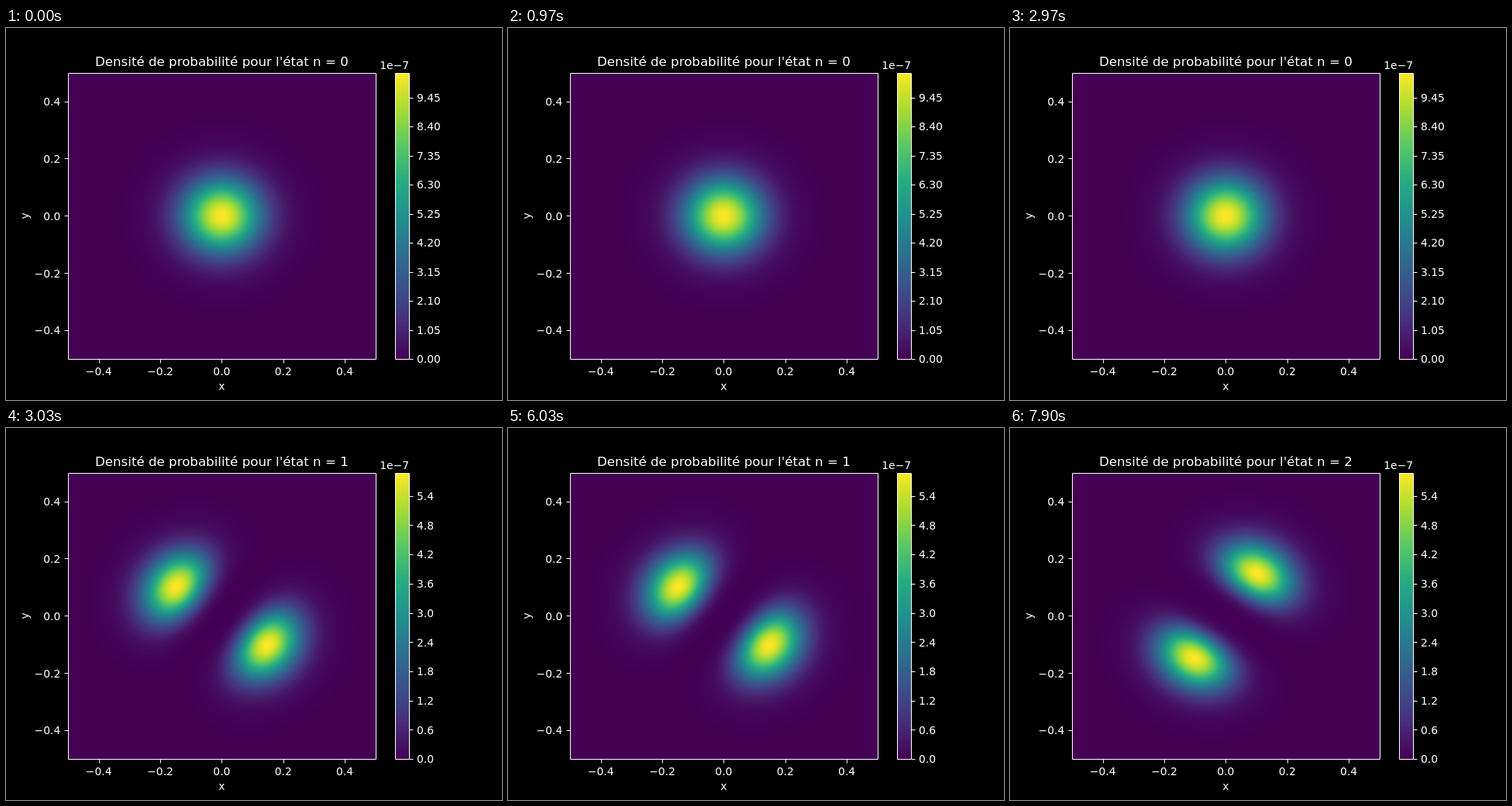
An HTML page with a canvas for the animation above (8000 ms loop, 640 px wide and 480 px high).

```html
<!DOCTYPE html>
<html lang="fr">
<head>
<meta charset="utf-8">
<title>Densité de probabilité</title>
<style>
  html, body { margin: 0; width: 100%; height: 100%; overflow: hidden; background: #000; }
  canvas, svg { position: absolute; left: 0; top: 0; }
  text { font: 13.89px "DejaVu Sans", sans-serif; fill: #fff; }
  .title { font-size: 16.67px; }
  path { fill: none; stroke: #fff; stroke-width: 1; }
</style>
</head>
<body>
<canvas id="heat" width="640" height="480"></canvas>
<svg id="axes" width="640" height="480"></svg>
<script>
const LOOP = 8000;
const plot = { left: 80, top: 57.6, width: 396.8, height: 369.6 };
const bottom = plot.top + plot.height;
const barRight = 520.1;
const SPREAD = 0.0162;           // Gaussian width squared
const AXIS = [-0.822, 0.57];     // direction of the first excited state

// Each state: start time, lobe direction, colour bar maximum, tick step, decimals
const states = [
  { start: 0, dir: null, max: 10.35, step: 1.05, digits: 2 },
  { start: 3030, dir: AXIS, max: 5.88, step: 0.6, digits: 1 },
  { start: 6070, dir: [AXIS[1], -AXIS[0]], max: 5.88, step: 0.6, digits: 1 }
];

// Viridis, evenly spaced
const ramp = [
  [68, 1, 84], [71, 44, 122], [59, 81, 139], [44, 113, 142], [33, 144, 141],
  [39, 173, 129], [92, 200, 99], [170, 220, 50], [253, 231, 37]
];

function colour(v) {
  const pos = Math.min(1, v) * (ramp.length - 1);
  const i = Math.min(ramp.length - 2, Math.floor(pos));
  return ramp[i].map((c, k) => Math.round(c + (ramp[i + 1][k] - c) * (pos - i)));
}

function density(x, y, dir) {
  const gauss = Math.exp(-(x * x + y * y) / SPREAD);
  if (!dir) return gauss;
  const u2 = (x * dir[0] + y * dir[1]) ** 2 / (2 * SPREAD);
  return u2 * u2 * gauss * Math.exp(2);
}

const ctx = document.getElementById("heat").getContext("2d");

function paintHeat(dir) {
  const image = ctx.createImageData(397, 370);
  for (let j = 0, p = 0; j < 370; j++) {
    for (let i = 0; i < 397; i++, p += 4) {
      const x = (i + 0.5) / plot.width - 0.5;
      const y = 0.5 - (j + 0.9) / plot.height;
      image.data.set([...colour(density(x, y, dir)), 255], p);
    }
  }
  ctx.putImageData(image, 80, 58);
  for (let y = 58; y < 428; y++) {
    ctx.fillStyle = `rgb(${colour(Math.max(0, bottom - y - 0.5) / plot.height)})`;
    ctx.fillRect(502, y, 18, 1);
  }
}

const snap = v => Math.round(v) + 0.5;
const line = d => `<path d="${d}"/>`;
const label = (x, y, s, anchor = "middle", extra = "") =>
  `<text x="${x}" y="${Math.round(y)}" text-anchor="${anchor}" ${extra}>${s}</text>`;
const number = (v, digits) => v.toFixed(digits).replace("-", "\u2212");

function drawAxes(state, n) {
  const mid = plot.left + plot.width / 2;
  let out = line("M80.5 58.5H477.5V427.5H80.5Z") + line("M502.5 58.5H520.5V427.5H502.5Z");
  for (let k = -2; k <= 2; k++) {
    const v = k * 0.2;
    const x = plot.left + (v + 0.5) * plot.width;
    const y = plot.top + (0.5 - v) * plot.height;
    out += line(`M${snap(x)} 428v4.5`) + label(x, 448, number(v, 1));
    out += line(`M80 ${snap(y)}h-4.5`) + label(70.3, y + 5.2, number(v, 1), "end");
  }
  for (let k = 0; k * state.step < state.max; k++) {
    const v = k * state.step;
    const y = bottom - v / state.max * plot.height;
    out += line(`M521 ${snap(y)}h4.5`) + label(530, y + 5.2, number(v, state.digits), "start");
  }
  out += label(mid, 467, "x");
  out += label(0, 0, "y", "middle", 'transform="translate(28.5 242.4) rotate(-90)"');
  out += label(barRight, 53, "1e\u22127", "end");
  out += label(mid, 49, `Densité de probabilité pour l'état n = ${n}`, "middle", 'class="title"');
  document.getElementById("axes").innerHTML = out;
}

let shown = -1;
function show(n) {
  if (n === shown) return;
  shown = n;
  paintHeat(states[n].dir);
  drawAxes(states[n], n);
}

const origin = performance.now();
function tick() {
  const t = (performance.now() - origin) % LOOP;
  show(states.findLastIndex(s => t >= s.start));
  requestAnimationFrame(tick);
}
tick();
</script>
</body>
</html>
```
